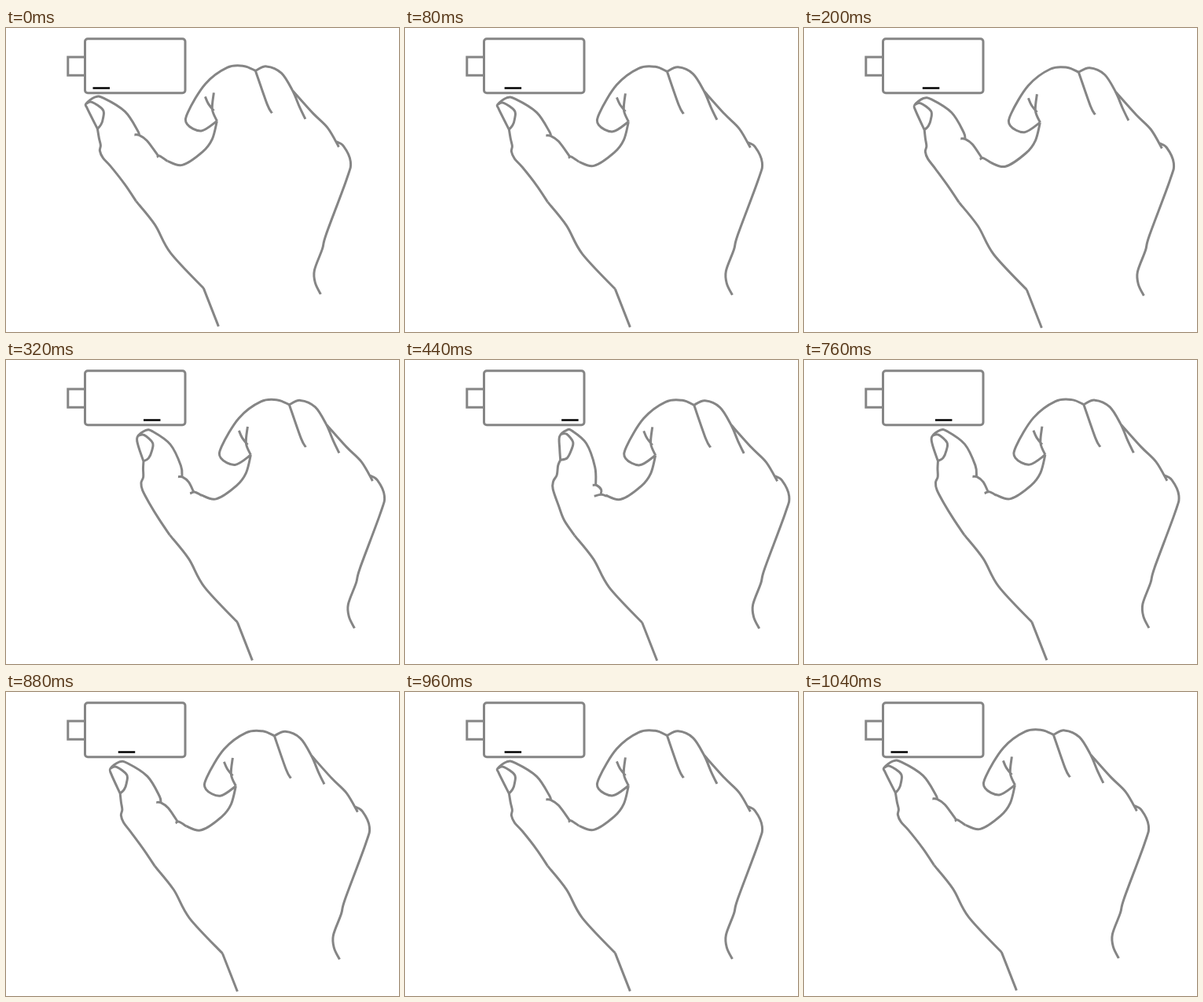
Recreate the animation shown at these times as an HTML page. Size 500x387 px, loop 1080 ms.

```html
<!DOCTYPE html>
<html lang="en">
<head>
<meta charset="utf-8">
<title>Thumb swipe</title>
<style>
  html, body { margin: 0; height: 100%; overflow: hidden; background: #fff; }
  svg { display: block; }
</style>
</head>
<body>
<svg width="500" height="387" viewBox="0 0 500 387" fill="none" stroke="#858585" stroke-width="3">
  <path d="M100 36.9H78.8V60.2H100"/>
  <rect x="100.5" y="13.7" width="127.5" height="69" rx="3.5"/>
  <path id="bar" d="M110.5 76.5h21.5" stroke="#000" stroke-width="2.5"/>
  <g id="hand">
    <path id="palm"/>
    <path id="thumb" stroke-linejoin="round"/>
  </g>
</svg>
<script>
const STEP = 40, LOOP = 1080, LAST = 11, POSES = 3;
const [bar, hand, palm, thumb] = ["bar", "hand", "palm", "thumb"].map(id => document.getElementById(id));

const parse = text => text.split(" ").map(point => point.split(",").map(Number));
const mix = (a, b, u) => a + (b - a) * u;

// Smooth path through key points (Catmull-Rom).
function curve(points) {
  const at = i => points[Math.max(0, Math.min(points.length - 1, i))];
  const handle = (i, side) => at(i).map((v, k) => v + side * (at(i + 1)[k] - at(i - 1)[k]) / 6);
  return "M" + points[0] + points.slice(1).map((p, i) =>
    `C${handle(i, 1)} ${handle(i + 1, -1)} ${p}`).join("");
}

const palmLines = [
  "165,220 189,250 209,286 251,331",                                              // wrist
  "251,331 270,379.5",
  "205,169 224,174 250,157 262,141 268,118",                                      // palm
  "268,118 262,103 264,82",                                                       // index finger
  "253,87 257,96 264,105",
  "268,118 248,130.5 230,122 231,107 253,71 281,50 302,48 317,54",
  "317,54 332,97 338,108",                                                        // other fingers
  "317,54 331,48.5 350,57 364,79 373,100 380.5,115.5",
  "364,79 390,108 409,127 423,151",
  "419,144 429,150 438,170 433,192 407,262 402,281 392,308 393,324 400,338.5"     // outer edge
];
palm.setAttribute("d", palmLines.map(line => curve(parse(line))).join(""));

// Each thumb line: key points when stretched out, then when drawn in.
const thumbLines = [
  ["165,220 151,199 133,176 123,165 119,156 120,149 118,140 116,128",             // back
   "165,220 152,201 145,183 137.5,161 138,151 142.5,143 144,131 147,124"],
  ["116,128 103,102 101.5,96 113,87.5 124,89 151,106 167,130 169,136",            // tip and front
   "147,124 146,109 146,94 155,86 162,87 180,103 191,133 192,155"],
  ["101.5,96 109,94 123,104 123,115 120.5,122.5 116,128",                         // nail
   "148,91 155,91 163,101 161,111 155.5,121.5 147,124"],
  ["163,135.5 169,136 179,143 193,162", "188,156 193,156 199,162 198,169"],       // creases
  ["191.5,164 195,162.5 205,169", "190,170 199,168 206,170"]
].map(pair => pair.map(parse));

const bend = u => thumbLines.map(([out, drawnIn]) =>
  curve(out.map((p, i) => p.map((v, k) => mix(v, drawnIn[i][k], u))))).join("");

// The hand slides fast at first; each thumb pose lasts three steps.
const slides = [{ x: 0, dx: 8 }, { x: 16, dx: 8 }, { x: 34, dx: 4.5 }, { x: 45.1, dx: 2.6 }];

function draw(time) {
  const step = Math.floor(time % LOOP / STEP);
  const n = Math.max(0, Math.min(LAST, step, 26 - step));
  const pose = Math.floor(n / 3);
  const x = slides[pose].x + slides[pose].dx * (n % 3);
  bar.setAttribute("transform", `translate(${8.06 * n})`);
  hand.setAttribute("transform", `translate(${x + 0.4} ${x * 0.058 + 0.4})`);
  thumb.setAttribute("d", bend((pose / POSES) ** 1.7));
}

const start = performance.now();
function tick() {
  draw(performance.now() - start);
  requestAnimationFrame(tick);
}
tick();
</script>
</body>
</html>
```
